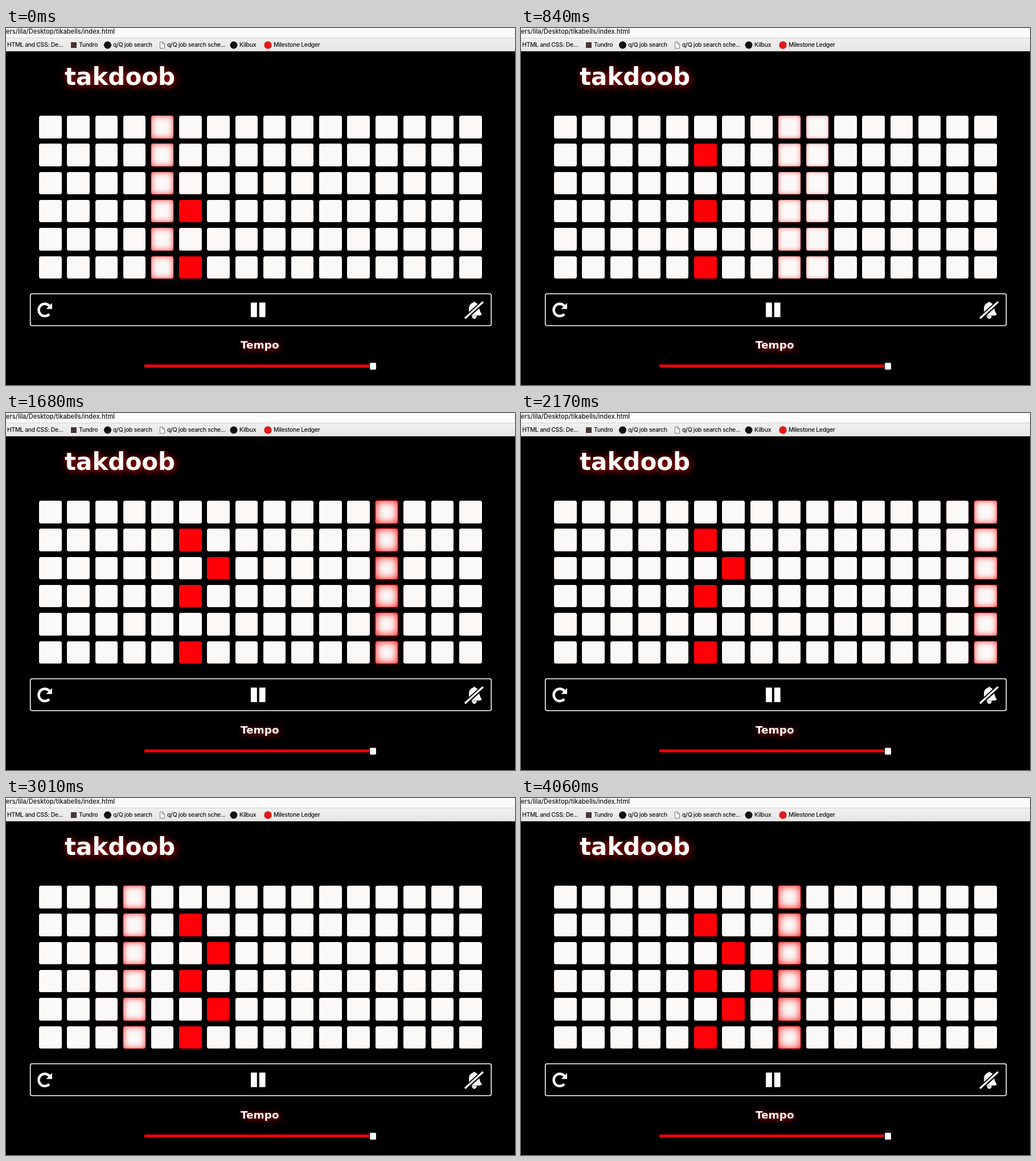
Recreate the animation shown at these times as an HTML page. Size 894 by 627 pixels, loop 4130 ms.

```html
<!DOCTYPE html>
<html lang="en">
<head>
<meta charset="utf-8">
<title>Step sequencer</title>
<style>
  html, body { margin: 0; width: 100%; height: 100%; overflow: hidden; background: #000; }
  #stage { position: relative; width: 894px; height: 627px; overflow: hidden; background: #000; }
  svg { position: absolute; left: 0; top: 0; }
  .ui { font-family: Inter, Roboto, sans-serif; font-weight: 500; fill: #111; }
  .path { font-size: 11.1px; }
  .marks { font-size: 10.4px; letter-spacing: -.3px; }
  .techno {
    position: absolute; line-height: 1; white-space: pre; color: #fff;
    font-family: "DejaVu Sans", sans-serif; font-weight: bold;
  }
  #title { left: 103px; top: 64.5px; font-size: 42px; text-shadow: 2px 2px 14px rgba(255, 0, 0, .8); }
  #tempo { left: 412px; top: 548px; font-size: 18.4px; text-shadow: 2px 2px 12px rgba(255, 0, 0, .8); }
  .cell {
    --w: 0; --on: 0;
    position: absolute; width: 39.4px; height: 39.4px; border-radius: 3.5px;
    background: linear-gradient(rgba(255, 0, 8, var(--on)) 0 0) #faf9f8;
    box-shadow:
      inset 0 0 calc(var(--w) * 15px) rgba(255, 0, 0, var(--w)),
      inset 0 0 calc(var(--w) * 2px) rgba(255, 0, 0, calc(var(--w) * .6)),
      0 0 calc(var(--w) * 4px) rgba(255, 0, 0, var(--w));
  }
</style>
</head>
<body>
<div id="stage">
  <svg width="894" height="627">
    <defs>
      <linearGradient id="bar" x2="0" y2="1">
        <stop stop-color="#f0f0f0"/><stop offset="1" stop-color="#e6e6e6"/>
      </linearGradient>
    </defs>

    <!-- browser bars -->
    <rect width="894" height="17" fill="#fbfbfb"/>
    <rect y="17" width="894" height="24" fill="url(#bar)"/>
    <path d="M0 17.5H894M0 40.5H894" stroke="#cecece"/>
    <text class="ui path" x="0" y="10">ers/lila/Desktop/tikabells/index.html</text>
    <g class="ui marks">
      <text x="2" y="33">HTML and CSS: De...</text>
      <text x="128" y="33">Tundro</text>
      <text x="188" y="33">q/Q job search</text>
      <text x="283" y="33">q/Q job search sche...</text>
      <text x="410" y="33">Kilbux</text>
      <text x="470" y="33">Milestone Ledger</text>
    </g>
    <rect x="114" y="25" width="10" height="10" fill="#4a3535"/>
    <circle cx="178.5" cy="30" r="6.5" fill="#111"/>
    <circle cx="400" cy="30" r="6.5" fill="#111"/>
    <circle cx="460" cy="30" r="6.7" fill="#e01a1a"/>
    <path d="M270.5 24.5H275L278.5 28V35.5H270.5ZM275 24.5V28H278.5" fill="#fff" stroke="#777"/>

    <!-- controls -->
    <rect x="42.7" y="466.8" width="809.6" height="56" rx="3" fill="none" stroke="#fff" stroke-width="1.6"/>
    <path d="M76.5 488.5A10.7 10.7 0 1 0 76 502.5" fill="none" stroke="#fff" stroke-width="4.4"/>
    <path d="M81 483V493.5H70.5Z" fill="#fff"/>
    <path d="M430 482.3h10.8v25.4h-10.8zM444.8 482.3h10.8v25.4h-10.8z" fill="#fff"/>
    <path d="M821 482Q822.5 479 824 482Q830 484 831 491Q832 498 836 503.5L832 505H812Q814 499 813 492Q814 484 821 482Z" fill="#fff"/>
    <path d="M818 505.5H827Q826 511 822.5 511Q819 511 818 505.5Z" fill="#fff"/>
    <path d="M804 512L840 479.5" stroke="#000" stroke-width="7.5"/>
    <path d="M806 510L838 481" stroke="#fff" stroke-width="3.2"/>

    <!-- tempo slider -->
    <rect x="243" y="591" width="400" height="5" fill="#f00008"/>
    <rect x="638.5" y="587.5" width="12" height="13" rx="2.5" fill="#fff" stroke="#000"/>
  </svg>
  <div id="title" class="techno">takdoob</div>
  <div id="tempo" class="techno">Tempo</div>
</div>
<script>
  const LOOP = 4130, TICK = 70, COLS = 16, ROWS = 6;
  const CROSSFADE = 0.57;   // share of a beat
  const PRESS_FADE = 140;   // ms

  // Slightly uneven playback clock: [time in ms, beat]
  const clock = [[0, 5.14], [840, 9.25], [1680, 12.99], [2170, 15.46],
                 [2590, 17.44], [3360, 21.14], [4060, 24.55]];

  // Pads switched on: [row, column, time in ms]
  const presses = [[3, 5, -999], [5, 5, -999], [1, 5, 280],
                   [2, 6, 1400], [4, 6, 2520], [3, 7, 3710]];

  const stage = document.getElementById('stage');
  const clamp = v => Math.min(1, Math.max(0, v));

  const grid = Array.from({ length: COLS }, (_, c) =>
    Array.from({ length: ROWS }, (_, r) => {
      const cell = document.createElement('div');
      cell.className = 'cell';
      cell.style.left = 58.2 + c * 49.2 + 'px';
      cell.style.top = 154.2 + r * 49.27 + 'px';
      return stage.appendChild(cell);
    }));

  function beatAt(t) {
    const i = Math.max(1, clock.findIndex(([end]) => end >= t));
    const [t0, b0] = clock[i - 1], [t1, b1] = clock[i];
    return b0 + (b1 - b0) * (t - t0) / (t1 - t0);
  }

  function draw(t) {
    const beat = beatAt(t), step = Math.floor(beat);
    const w = clamp((beat - step) / CROSSFADE);
    grid.forEach((column, c) => {
      const glow = c === step % COLS ? w : c === (step - 1) % COLS ? 1 - w : 0;
      column.forEach(cell => cell.style.setProperty('--w', glow.toFixed(3)));
    });
    for (const [r, c, start] of presses) {
      grid[c][r].style.setProperty('--on', clamp((t - start) / PRESS_FADE));
    }
  }

  const begin = performance.now();
  function frame() {
    const t = (performance.now() - begin) % LOOP;
    draw(Math.floor(t / TICK) * TICK);
    requestAnimationFrame(frame);
  }
  frame();
</script>
</body>
</html>
```
